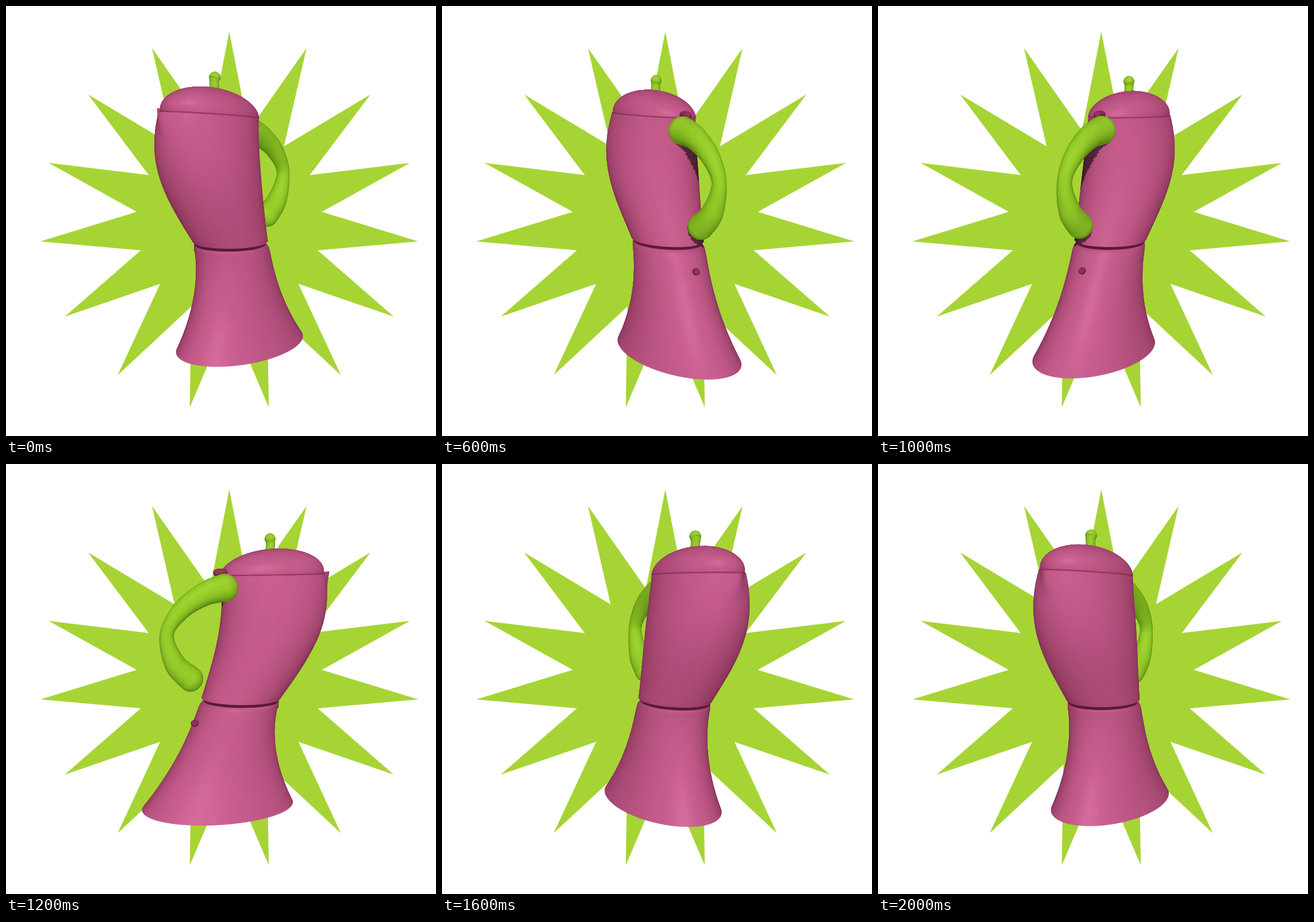
Recreate the animation shown at these times as an HTML page with a canvas. Size 748 by 748 pixels, loop 2200 ms.

```html
<!DOCTYPE html>
<html lang="en">
<head>
<meta charset="utf-8">
<title>Turning coffee pot</title>
<style>
  html, body { margin: 0; height: 100%; overflow: hidden; background: #fff; }
  canvas { display: block; width: 100vw; height: 100vh; }
</style>
</head>
<body>
<canvas id="stage" width="748" height="748"></canvas>
<script>
const ctx = document.getElementById('stage').getContext('2d');
const { PI, sin, cos, exp, max, min, hypot, floor } = Math;

const STEP = 200, STEPS = 11;
const AXIS = 404, EYE = 190, DISTANCE = 1090, ROLL = 0.025;
const LIGHT = [0, -0.4, 0.917];
const PINK = { dark: [127, 45, 82], lit: [196, 90, 140], shine: 16 };
const GREEN = { dark: [88, 134, 18], lit: [152, 206, 42], shine: 8 };
const PLUM = { dark: [70, 22, 44], lit: [150, 56, 98], shine: 0 };
const SEAM = { dark: [88, 26, 52], lit: [88, 26, 52], shine: 0 };
const RIM = { dark: [126, 40, 78], lit: [150, 58, 98], shine: 0 };

// Angle of the handle around the pot: 0 faces the viewer, 90 degrees points right.
const yawAt = step =>
  (137.5 - 34.9 * step + 4 * sin(2 * PI * (step - 1) / STEPS)) * PI / 180;

// Pot space: u towards the handle, v across, y down from eye level.
const place = ([u, v, y], yaw) =>
  [u * sin(yaw) + v * cos(yaw), y, u * cos(yaw) - v * sin(yaw)];

function project([x, y, z]) {
  const k = DISTANCE / (DISTANCE - z);
  return [AXIS + (x - ROLL * y) * k, EYE + (y + ROLL * x) * k];
}

// A stack of ovals; ring(s) runs from top to bottom.
const solid = ring => (s, angle) => {
  const { y, mid, long, wide, tilt = 0, lip = 0 } = ring(s);
  const spout = lip * exp(-(((angle - PI) / 0.22) ** 2));
  const u = mid + long * cos(angle) - spout;
  return [u, wide * sin(angle), y + tilt * (u + 62) - spout * 0.2];
};

// Catmull-Rom curve through [u, y, radius] keys.
function spline(keys, q) {
  const last = keys.length - 1;
  const i = min(last - 1, max(0, floor(q * last)));
  const f = q * last - i;
  const [a, b, c, d] = [-1, 0, 1, 2].map(k => keys[max(0, min(last, i + k))]);
  return b.map((v, n) => v + 0.5 * f * (c[n] - a[n] +
    f * (2 * a[n] - 5 * v + 4 * c[n] - d[n] + f * (3 * (v - c[n]) + d[n] - a[n]))));
}

// A round tube along the keys with domed ends.
const tube = keys => (s, angle) => {
  const cap = 0.12;
  const q = max(0, min(1, (s - cap) / (1 - 2 * cap)));
  const dome = (max(0, s - 1 + cap) - max(0, cap - s)) / cap * PI / 2;
  const [u, y, r] = spline(keys, q);
  const from = spline(keys, max(0, q - 0.01)), to = spline(keys, min(1, q + 0.01));
  const length = hypot(to[0] - from[0], to[1] - from[1]);
  const du = (to[0] - from[0]) / length, dy = (to[1] - from[1]) / length;
  const along = r * sin(dome), out = r * cos(dome);
  return [
    u + du * along + dy * out * cos(angle),
    out * sin(angle),
    y + dy * along - du * out * cos(angle)
  ];
};

const bodyRing = s => {
  const t = 1 - s;
  return {
    y: 217 * s,
    mid: -11 - 59 * sin(0.62 * PI * t),
    long: 69 + 27 * sin(0.55 * PI * t),
    wide: 59 + 18 * sin(0.92 * PI * t ** 1.1),
    tilt: 0.04 * t ** 4,
    lip: 14 * max(0, t * 5 - 4) ** 1.5
  };
};
const baseRing = s => ({
  y: 223 + 177 * s,
  mid: -11 + 35 * s ** 0.7,
  long: 69 + 64 * s ** 1.9 - 3 * exp(-s * 60),
  wide: 59 + 26 * s ** 2.6 - 3 * exp(-s * 60)
});
const collarRing = s => ({ y: 212 + 20 * s, mid: -11, long: 66.5, wide: 56.5 });
const rimRing = s => ({ y: 1.4 * s, mid: -65, long: 95.7, wide: 63.5, tilt: 0.04 });
const lidRing = s => {
  const rise = cos(s * PI / 2), spread = sin(s * PI / 2);
  return { y: -44.5 * rise, mid: -64 - 10 * rise, long: 95 * spread, wide: 63 * spread, tilt: 0.04 };
};

const handleKeys = [
  [25, 26, 24], [60, 37, 20], [100, 65, 15.5], [124, 106, 11.5], [109, 154, 17.5], [81, 181, 21]
];
const body = solid(bodyRing), base = solid(baseRing), lid = solid(lidRing);
const collar = solid(collarRing), rim = solid(rimRing);
const handle = tube(handleKeys);
const knob = tube([[-58, -36, 8], [-59, -54, 7.5], [-58, -62, 9.5]]);
const hinge = tube([[26, -1, 6], [39, 0, 6]]);
const valve = tube([[70, 257, 5], [73, 257, 5]]);

const dot = (a, b) => a[0] * b[0] + a[1] * b[1] + a[2] * b[2];
const minus = (a, b) => a.map((v, i) => v - b[i]);

// True when a ball lies between the point and the light.
const shaded = (point, balls) => balls.some(({ centre, radius }) => {
  const way = minus(centre, point), along = dot(way, LIGHT);
  return along > 0 && dot(way, way) - along * along < radius * radius;
});

function colour(normal, tone, dimmed) {
  const light = max(0, dot(normal, LIGHT) / (hypot(...normal) || 1));
  const glint = tone.shine * light ** 40;
  const rgb = tone.dark.map((v, i) =>
    (v + (tone.lit[i] - v) * min(1, light / 0.92) + glint) * (dimmed ? 0.47 : 1));
  return `rgb(${rgb.map(Math.round)})`;
}

function fillPolygon(points, fill) {
  ctx.beginPath();
  points.forEach(p => ctx.lineTo(...p));
  ctx.closePath();
  ctx.fillStyle = ctx.strokeStyle = fill;
  ctx.fill();
  ctx.stroke();
}

function drawMesh(surface, yaw, tone, rows, columns, balls = []) {
  const grid = Array.from({ length: rows + 1 }, (_, i) =>
    Array.from({ length: columns + 1 }, (_, j) => {
      const point = place(surface(i / rows, 2 * PI * j / columns), yaw);
      return { point, screen: project(point) };
    }));
  const faces = [];
  for (let i = 0; i < rows; i++) {
    for (let j = 0; j < columns; j++) {
      const corners = [grid[i][j], grid[i][j + 1], grid[i + 1][j + 1], grid[i + 1][j]];
      const [a, b, c, d] = corners.map(corner => corner.screen);
      const area = (c[0] - a[0]) * (d[1] - b[1]) - (c[1] - a[1]) * (d[0] - b[0]);
      if (area > 0) faces.push(corners);
    }
  }
  const depth = corners => corners[0].point[2] + corners[2].point[2];
  faces.sort((m, n) => depth(m) - depth(n));
  for (const corners of faces) {
    const [a, b, c, d] = corners.map(corner => corner.point);
    const p = minus(c, a), q = minus(d, b);
    const normal = [p[1] * q[2] - p[2] * q[1], p[2] * q[0] - p[0] * q[2], p[0] * q[1] - p[1] * q[0]];
    const centre = a.map((v, i) => (v + c[i]) / 2);
    fillPolygon(corners.map(corner => corner.screen), colour(normal, tone, shaded(centre, balls)));
  }
}

function drawStar() {
  const points = Array.from({ length: 30 }, (_, i) => {
    const r = i % 2 ? 161 : 328.8, angle = i * PI / 15;
    return [388.4 + r * sin(angle), 375 - r * cos(angle)];
  });
  fillPolygon(points, '#a6d434');
}

function drawMouth(yaw) {
  const edge = Array.from({ length: 120 }, (_, j) => project(place(body(0, j * PI / 60), yaw)));
  fillPolygon(edge, '#a8486f');
}

function draw(yaw) {
  const handleInFront = cos(yaw) > 0;
  const balls = handleInFront ? Array.from({ length: 40 }, (_, i) => {
    const [u, y, radius] = spline(handleKeys, i / 39);
    return { centre: place([u, 0, y], yaw), radius };
  }) : [];
  const drawHandle = () => {
    drawMesh(hinge, yaw, PLUM, 16, 20);
    drawMesh(handle, yaw, GREEN, 64, 40);
  };

  ctx.fillStyle = '#fff';
  ctx.fillRect(0, 0, 748, 748);
  ctx.lineWidth = 0.7;
  ctx.lineJoin = 'round';
  drawStar();
  if (!handleInFront) drawHandle();
  drawMesh(collar, yaw, SEAM, 4, 60);
  drawMesh(base, yaw, PINK, 60, 110, balls);
  if (handleInFront) drawMesh(valve, yaw, PLUM, 16, 20);
  drawMouth(yaw);
  drawMesh(body, yaw, PINK, 70, 120, balls);
  drawMesh(knob, yaw, GREEN, 30, 24);
  drawMesh(lid, yaw, PINK, 30, 100);
  drawMesh(rim, yaw, RIM, 1, 90);
  if (handleInFront) drawHandle();
}

let shown = -1;
const start = performance.now();
function tick() {
  const step = floor((performance.now() - start) / STEP) % STEPS;
  if (step !== shown) draw(yawAt(shown = step));
  requestAnimationFrame(tick);
}
tick();
</script>
</body>
</html>
```
